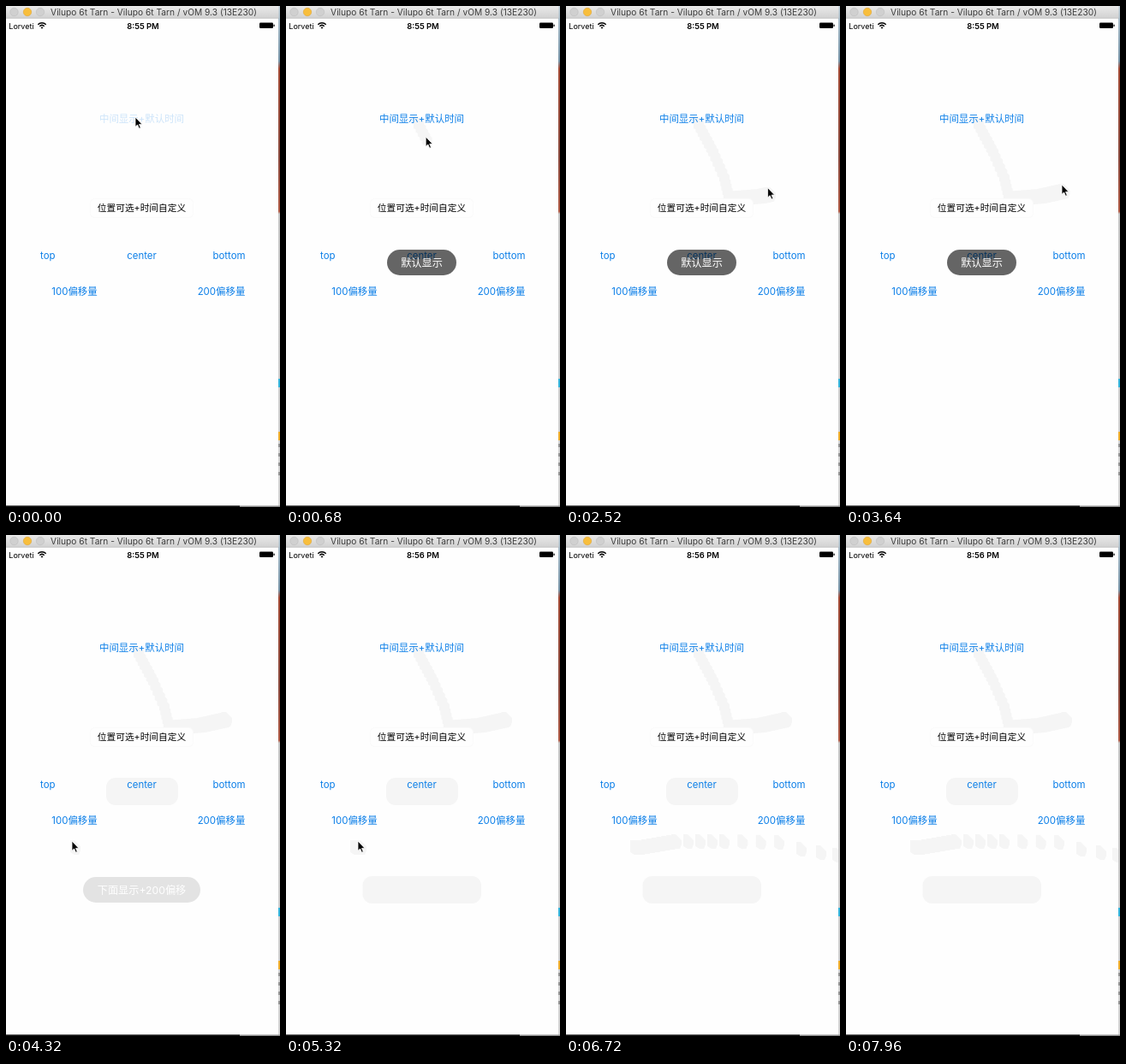
An HTML page for the animation above (8000 ms loop, 320x586 px).

```html
<!DOCTYPE html>
<html lang="zh-CN">
<head>
<meta charset="utf-8">
<title>Toast demo</title>
<style>
  html, body { margin: 0; width: 100%; height: 100%; overflow: hidden; background: #fff; }
  svg { display: block; width: 320px; height: 586px; }
  text { font-family: Inter, "Noto Sans CJK SC", "Noto Sans CJK", sans-serif; text-anchor: middle; }
  .link { fill: #0c7fe8; font-size: 11.45px; }
  .toast text { fill: #fff; font-size: 12.2px; }
  .toast rect { fill: #000; fill-opacity: .6; }
  .residue { fill: #f5f5f5; }
</style>
</head>
<body>
<svg viewBox="0 0 320 586">
  <defs>
    <linearGradient id="bar" x2="0" y2="1">
      <stop stop-color="#e9e9e9"/><stop offset="1" stop-color="#d2d2d2"/>
    </linearGradient>
    <linearGradient id="desk" x2="0" y2="1">
      <stop stop-color="#b9cad5"/><stop offset=".11" stop-color="#7895a8"/>
      <stop offset=".125" stop-color="#a44a35"/><stop offset=".3" stop-color="#8a4a3e"/>
      <stop offset=".41" stop-color="#b05a44"/><stop offset=".415" stop-color="#c5c5c5"/>
      <stop offset="1" stop-color="#d4d4d4"/>
    </linearGradient>
  </defs>

  <rect width="320" height="586" fill="#fefefe"/>
  <g class="residue">
    <path id="trail"/>
    <rect id="mark1" x="117" y="284" width="84" height="32" rx="11"/>
    <rect id="mark2" x="89.500" y="399" width="138.500" height="32" rx="11"/>
  </g>

  <rect x="98.500" y="225.500" width="120" height="22" rx="5" fill="#fefefe" stroke="#fafafa"/>
  <text id="press" class="link" x="158.500" y="136">中间显示+默认时间</text>
  <text x="158.500" y="240.300" font-size="10.7">位置可选+时间自定义</text>
  <text class="link" x="48.800" y="295.500">top</text>
  <text class="link" x="158.500" y="295.500">center</text>
  <text class="link" x="260.500" y="295.500">bottom</text>
  <text class="link" x="80" y="338.300">100偏移量</text>
  <text class="link" x="251.500" y="338.300">200偏移量</text>

  <g id="toast1" class="toast">
    <rect x="118" y="285" width="81" height="30" rx="15"/>
    <text x="158.500" y="304.500">默认显示</text>
  </g>
  <g id="toast2" class="toast">
    <rect x="90" y="400" width="137" height="30" rx="15"/>
    <text x="158.500" y="419.500">下面显示+200偏移</text>
  </g>

  <!-- status bar -->
  <text x="18" y="27" font-size="9">Lorveti</text>
  <g fill="none" stroke="#000" stroke-width="1.500">
    <path d="M37.300 21.700a6.600 6.600 0 0 1 9.400 0M39.300 23.700a3.900 3.900 0 0 1 5.400 0"/>
    <path d="M42 26.700l-1.500-1.700q1.500-1.100 3 0z" fill="#000" stroke="none"/>
  </g>
  <text id="clock" x="160" y="26.700" font-size="9.4" font-weight="600"></text>
  <rect x="296" y="19.500" width="16" height="6.500" rx="1.200"/>
  <rect x="312.500" y="21.500" width="1.200" height="2.500" rx=".5"/>

  <!-- window frame and desktop behind it -->
  <rect x="318" width="2" height="586" fill="url(#desk)"/>
  <rect x="318" y="436" width="2" height="10" fill="#35b5dc"/>
  <rect x="318" y="498" width="2" height="10" fill="#f0ae2c"/>
  <path d="M319 512V552" stroke="#555" stroke-dasharray="4 7"/>
  <rect y="584.500" width="320" height="1.500" fill="#8c8c8c"/>
  <rect y="584.500" width="273" height="1.500" fill="#111"/>
  <rect width="318.500" height="14" fill="url(#bar)"/>
  <path d="M0 14.300H318.500" stroke="#b5b5b5" stroke-width=".7"/>
  <g stroke-width=".6">
    <circle cx="9.500" cy="7" r="4.700" fill="#d0d0d0" stroke="#bcbcbc"/>
    <circle cx="25" cy="7" r="4.700" fill="#f8be3c" stroke="#dfa535"/>
    <circle cx="40" cy="7" r="4.700" fill="#d0d0d0" stroke="#bcbcbc"/>
  </g>
  <text x="172.500" y="11" font-size="10.2" fill="#3c3c3c">Vilupo 6t Tarn - Vilupo 6t Tarn / vOM 9.3 (13E230)</text>

  <path id="cursor" d="M0 0V11.300L2.600 9L4.500 13.300L6.300 12.500L4.500 8.400H8Z" stroke="#fff" stroke-width=".8"/>
</svg>
<script>
const LOOP = 8000, STEP = 40, CUT = 4280;
const $ = id => document.getElementById(id);

// Each key is [time, value, ...]; values are interpolated linearly.
const cursorKeys = [
  [0, 151, 130], [480, 151, 130], [760, 168, 162], [960, 181, 192], [1160, 187, 218],
  [1800, 225, 215], [3640, 252, 209], [3720, 254, 208], [CUT - 1, 254, 208],
  [CUT, 77, 358], [4600, 77, 358], [5200, 84, 358], [5960, 84, 358],
  [6240, 125, 351], [6400, 181, 351], [6520, 245, 352], [6560, 271, 360],
  [6600, 294, 364], [6640, 313, 367], [6680, 332, 371]
];
const fades = {
  press: [[0, .2], [160, .2], [360, 1]],
  toast1: [[200, 0], [420, 1], [3900, 1], [4160, 0]],
  toast2: [[CUT - 1, 0], [CUT, .27], [4320, .18], [4400, 0]],
  mark1: [[4159, 0], [4160, 1]],
  mark2: [[4399, 0], [4400, 1]]
};

function sample(keys, t) {
  const next = keys.findIndex(key => key[0] > t);
  if (next === 0) return keys[0].slice(1);
  if (next < 0) return keys.at(-1).slice(1);
  const a = keys[next - 1], b = keys[next];
  const k = (t - a[0]) / (b[0] - a[0]);
  return a.slice(1).map((v, i) => v + (b[i + 1] - v) * k);
}

// The pointer leaves a pale, pointer-shaped patch at every step it has passed.
const patches = [];
for (let t = 0; t < 6680; t += STEP) {
  const [x, y] = sample(cursorKeys, t);
  patches.push(`M${x - 2} ${y - 1}h5l7 7v5l-2 5h-5l-5-3z`);
}

let drawnPatches = -1;
function draw(now) {
  const t = now % LOOP;
  for (const id in fades) $(id).setAttribute('opacity', sample(fades[id], t)[0]);
  const [x, y] = sample(cursorKeys, t);
  $('cursor').setAttribute('transform', `translate(${x} ${y})`);
  $('clock').textContent = t < 4800 ? '8:55 PM' : '8:56 PM';
  const count = Math.min(patches.length, Math.floor(t / STEP));
  if (count !== drawnPatches) {
    $('trail').setAttribute('d', patches.slice(0, count).join(''));
    drawnPatches = count;
  }
}

const start = performance.now();
function tick() {
  draw(performance.now() - start);
  requestAnimationFrame(tick);
}
tick();
</script>
</body>
</html>
```
